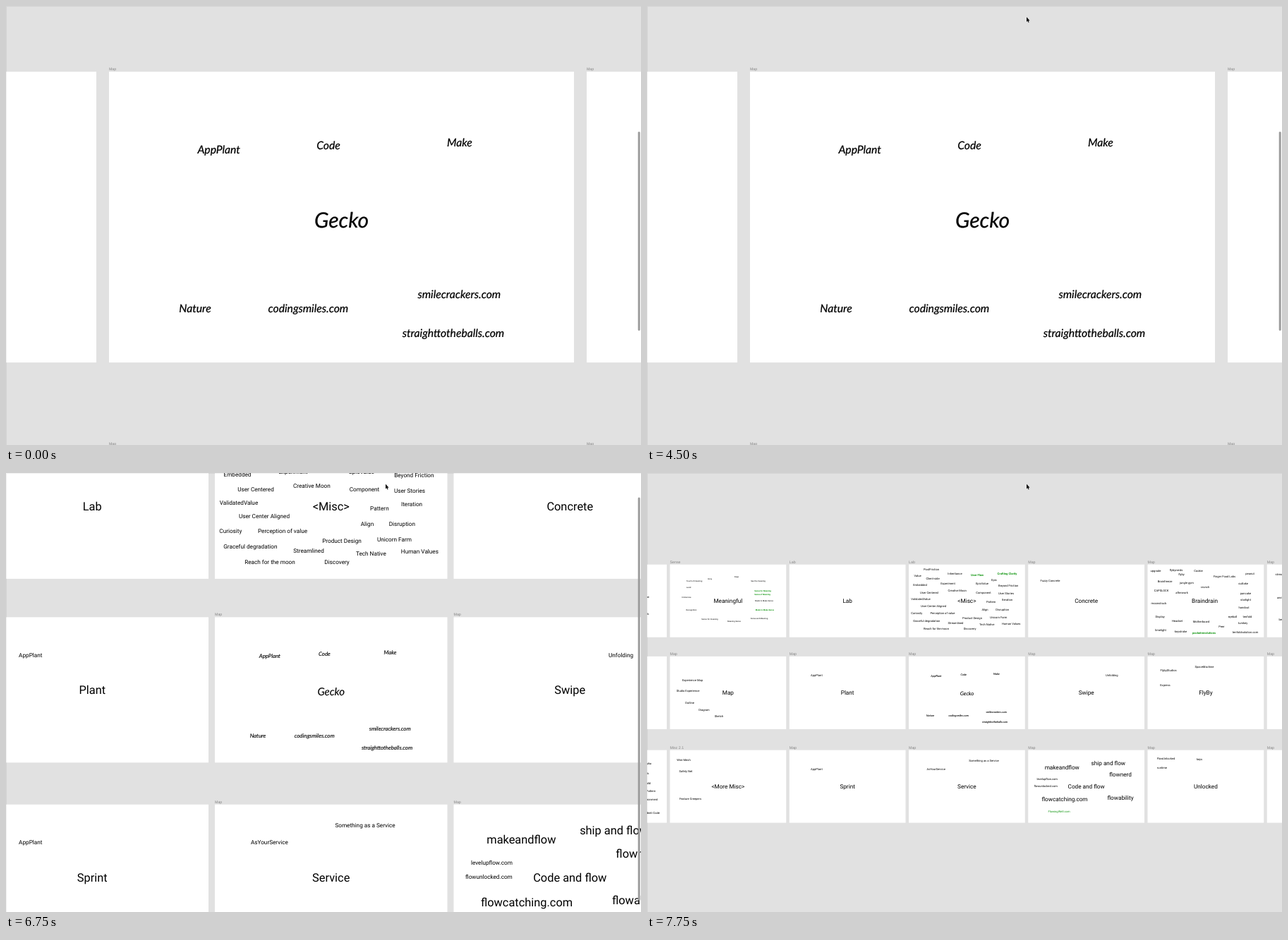
Animation of 900x622 px, one loop 8000 ms. Source, as an HTML page:

```html
<!DOCTYPE html>
<html lang="en">
<head>
<meta charset="utf-8">
<title>Naming boards</title>
<style>
  @property --zoom { syntax: "<number>"; inherits: true; initial-value: 4; }

  html, body { margin: 0; width: 100%; height: 100%; overflow: hidden; background: #e1e1e1; }
  svg { display: block; width: 900px; height: 622px; animation: zoom 8s step-end infinite; }
  text { text-rendering: geometricPrecision; }

  #world { transform-origin: 446px 315.5px; transform: scale(var(--zoom)); }
  #boards { font-family: Roboto, sans-serif; text-anchor: middle; fill: #000; }
  .board { font-size: 4.1px; }
  .board rect { fill: #fff; }
  .big { font-size: 8.2px; }
  .fine text:not(.big) { font-size: 2.8px; }
  .green { fill: #129612; }
  .bold { font-weight: 700; }
  .hand { font: italic 3.93px Kalam, Lato, cursive; stroke: #000; stroke-width: .06px; }
  .hand .big { font-size: 7.5px; }

  /* Board labels keep their size on screen at every zoom. */
  #labels {
    font-family: "Liberation Sans", Arial, sans-serif;
    font-size: calc(5.3px / var(--zoom));
    transform: translateY(calc(-2px / var(--zoom)));
    fill: #868686;
  }

  .edge { fill: none; stroke: #000; stroke-opacity: .06; }
  .bar { fill: #9c9c9c; opacity: 0; animation: 8s step-end infinite; }
  #barNear { animation-name: near; }
  #barMid { animation-name: mid; }
  #cursor { fill: #000; stroke: #fff; stroke-width: .5; paint-order: stroke; animation: pointer 8s step-end infinite; }

  @keyframes zoom { 0% { --zoom: 4; } 62.5% { --zoom: 2; } 93.75%, 100% { --zoom: 1; } }
  @keyframes near { 0% { opacity: 1; } 62.5%, 100% { opacity: 0; } }
  @keyframes mid { 0% { opacity: 0; } 62.5% { opacity: 1; } 93.75%, 100% { opacity: 0; } }
  @keyframes pointer { 0% { opacity: 0; } 9.375%, 100% { opacity: 1; } }
</style>
</head>
<body>
<svg viewBox="0 0 900 622">
  <g id="world">
    <g id="boards"></g>
    <g id="labels"></g>
  </g>
  <path class="edge" d="M.5 622V.5H900"/>
  <rect id="barNear" class="bar" x="895.7" y="178" width="3" height="282" rx="1.5"/>
  <rect id="barMid" class="bar" x="895.7" y="34.5" width="3" height="571" rx="1.5"/>
  <path id="cursor" d="M538 15.8v6.6l1.5-1.3 1 2.3 1.1-.5-1-2.2h2z"/>
</svg>
<script>
const NS = "http://www.w3.org/2000/svg";
const WIDTH = 164.75, HEIGHT = 103;
const colX = col => 371 + 169.25 * col;
const rowY = [129.7, 259.9, 392.6];

// Each line: centre x, centre y, words. Marks: + large, ~ green, * green and bold.
const boards = [
  { col: -3, row: 0, words: `
    -2.5 176 Vision
    -2.5 199.5 Tools` },
  { col: -2, row: 0, label: "Sense", title: "Meaningful", style: "fine", words: `
    67 153.5 Touch of meaning
    89 150 Irony
    127 147 Deep
    157.5 153.5 See the meaning
    59 162 Lucid
    56 176 Immersive
    63 194.5 Recognition
    89 207.5 Sense for meaning
    123.5 210 Meaning Sense
    159 206 Sense and Meaning
    164 167.5 *Sense for Meaning
    163.5 172 *Sense of Meaning
    166 181 Made to Make Sense
    167 194 *Made to Make Sense` },
  { col: -1, row: 0, label: "Lab", title: "Lab" },
  { col: 0, row: 0, label: "Lab", title: "<Misc>", words: `
    403 137 PostFriction
    383.5 145.5 Value
    405 149.3 Client-side
    436.5 142.5 Inheritance
    468 145 *User Flow
    510.5 143 *Crafting Clarity
    492 152 Epic
    387 159 Embedded
    426.5 156.7 Experiment
    475 156.7 EpicValue
    512.2 159.2 Beyond Friction
    400 169.2 User Centered
    439.7 167 Creative Moon
    477 169.2 Component
    509 170.5 User Stories
    388 179 ValidatedValue
    510.5 180 Iteration
    487.7 182.7 Pattern
    406 188.5 User Center Aligned
    479 193.7 Align
    503.7 193.7 Disruption
    382.2 198.7 Curiosity
    419 198.7 Perception of value
    461 206 Product Design
    498.2 204.7 Unicorn Farm
    396.2 209.7 Graceful degradation
    437.5 213 Streamlined
    481.7 214.7 Tech Native
    516.2 213.5 Human Values
    410 221 Reach for the moon
    457.5 221 Discovery` },
  { col: 1, row: 0, label: "Map", title: "Concrete", words: `
    571.5 153 Fuzzy Concrete` },
  { col: 2, row: 0, label: "Map", words: `
    790.5 181.2 +Braindrain
    721 139 upgrade
    750 138 flybynerds
    757.5 143.7 flyby
    781.5 139 Cookie
    818.5 147 Finger Food Labs
    854.5 143 peanut
    734 154 Brainfreeze
    765 155.5 jungle gym
    845 156.5 outtake
    791 161.5 crunch
    729 166.5 CAPSLOCK
    758 170 afterwork
    848.5 171 pancake
    848.5 179.5 starlight
    725.5 185 moonstruck
    846 191 handout
    727 203.5 Display
    830 203.5 eyeball
    851 203.5 tenfold
    751.5 210 Headset
    785.5 211 Motherboard
    844.5 213 turnkey
    814.5 218 Peer
    728 222.5 limelight
    756.5 224.5 keystroke
    789.5 226.5 *pocketrevolutions
    848 225.5 tenfoldsolution.com` },
  { col: 3, row: 0, label: "Map", words: `
    897 143.5 stream
    900 177 unstuck
    901 208 bench` },

  { col: -3, row: 1 },
  { col: -2, row: 1, label: "Map", title: "Map", words: `
    64.5 293.5 Experience Map
    58 308.7 Studio Experience
    60.5 326 Outline
    81 336 Diagram
    102 344.5 Sketch` },
  { col: -1, row: 1, label: "Map", title: "Plant", words: `
    240.4 286.7 AppPlant` },
  { col: 0, row: 1, label: "Map", style: "hand", words: `
    453.4 312.5 +Gecko
    409.9 287.4 AppPlant
    448.75 286.1 Code
    495.25 284.9 Make
    401.5 343.8 Nature
    441.6 343.8 codingsmiles.com
    495.1 338.8 smilecrackers.com
    493 352.4 straighttotheballs.com` },
  { col: 1, row: 1, label: "Map", title: "Swipe", words: `
    658.8 286.7 Unfolding` },
  { col: 2, row: 1, label: "Map", title: "FlyBy", words: `
    739 279.3 FlybyStudios
    790 274.3 SpaceMachine
    734.5 301 Express` },
  { col: 3, row: 1, label: "Map" },

  { col: -3, row: 2, words: `
    1 412 Alpha
    -2.5 425.5 Tools
    .4 440 Build
    5.5 451 Pattern
    3.8 462.5 Environment
    7.7 482 Identi Code` },
  { col: -2, row: 2, label: "Misc 2.1", title: "<More Misc>", words: `
    52 407 Wire Mesh
    55 423 Safety Net
    61.5 461.3 Feature Creepers` },
  { col: -1, row: 2, label: "Map", title: "Sprint", words: `
    240.4 419.5 AppPlant` },
  { col: 0, row: 2, label: "Map", title: "Service", words: `
    477.5 407.2 Something as a Service
    409.7 419.5 AsYourService` },
  { col: 1, row: 2, label: "Map", title: "Code and flow", words: `
    588.2 417.5 +makeandflow
    653.8 411 +ship and flow
    671 427.2 +flownerd
    567.2 433.7 levelupflow.com
    565.2 444 flowunlocked.com
    592 461.7 +flowcatching.com
    671 460.3 +flowability
    584 479.3 ~FlowingWell.com` },
  { col: 2, row: 2, label: "Map", title: "Unlocked", words: `
    735.5 404.7 FlowUnlocked
    783 406 keys
    730 417.5 runtime` },
  { col: 3, row: 2, label: "Map" },
];

const markClass = { "+": "big", "~": "green", "*": "green bold" };

function add(parent, tag, attrs, content = "") {
  const node = document.createElementNS(NS, tag);
  for (const name in attrs) node.setAttribute(name, attrs[name]);
  node.textContent = content;
  return parent.appendChild(node);
}

function addWord(parent, x, y, words, style = "") {
  add(parent, "text", { x, y, dy: ".355em", class: style }, words);
}

const boardLayer = document.getElementById("boards");
const labelLayer = document.getElementById("labels");

for (const { col, row, label = "", title, style = "", words = "" } of boards) {
  const x = colX(col), y = rowY[row];
  const group = add(boardLayer, "g", { class: "board " + style });
  add(group, "rect", { x, y, width: WIDTH, height: HEIGHT, stroke: "none" });
  if (title) addWord(group, x + WIDTH / 2, y + HEIGHT / 2, title, "big");
  for (const [, wx, wy, mark, text] of words.matchAll(/(\S+) (\S+) ([+~*]?)(.+)/g)) {
    addWord(group, wx, wy, text, markClass[mark]);
  }
  add(labelLayer, "text", { x, y }, label);
}
</script>
</body>
</html>
```
